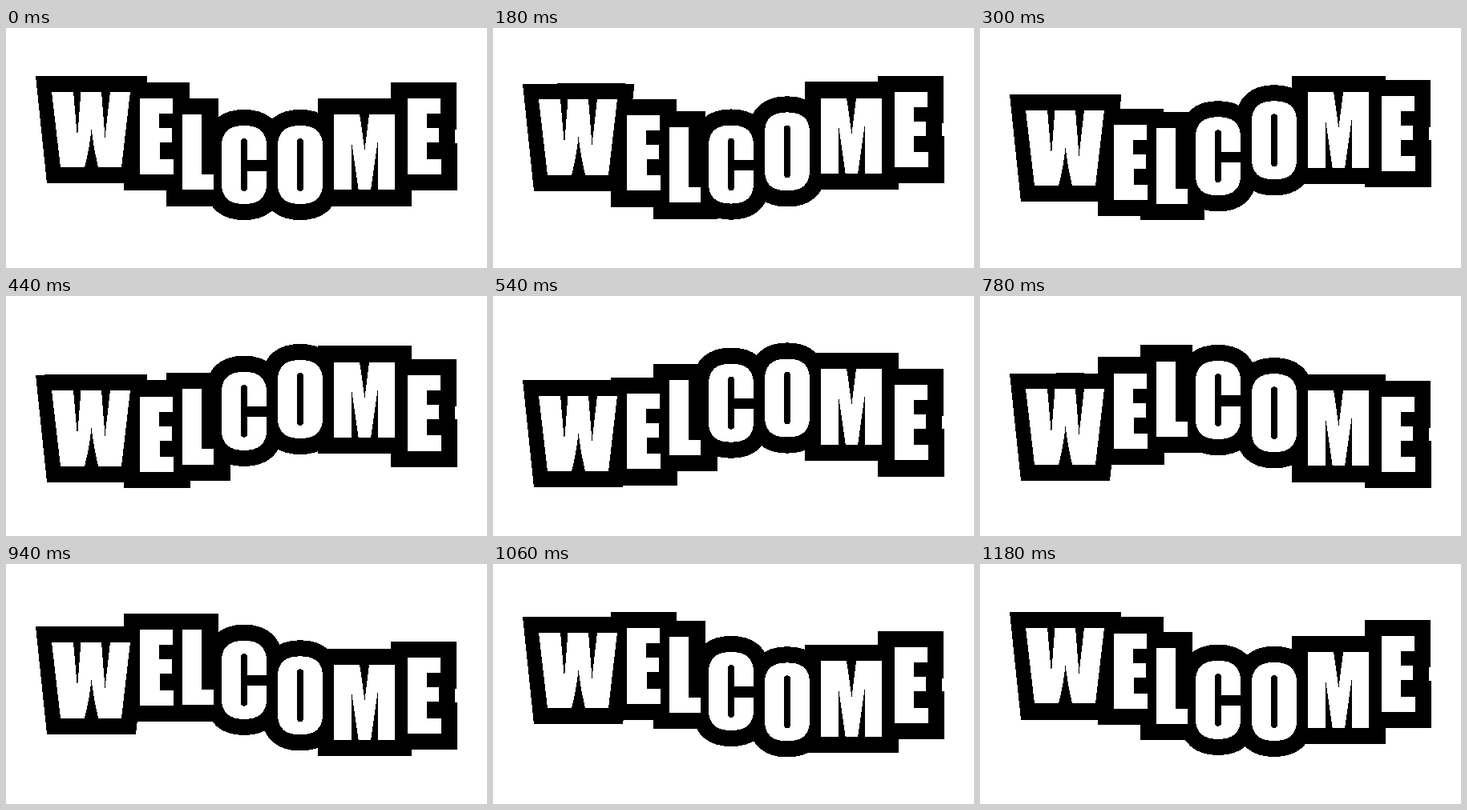
Write an HTML page that moves like this. It is 600x300 px and loops after 1.2 s.

```html
<!DOCTYPE html>
<html lang="en">
<head>
<meta charset="utf-8">
<title>Welcome</title>
<style>
  @property --k {
    syntax: "<integer>";
    inherits: true;
    initial-value: 0;
  }
  html, body {
    margin: 0;
    width: 100%;
    height: 100%;
    overflow: hidden;
    background: #fff;
  }
  svg {
    display: block;
    width: 600px;
    height: 300px;
    shape-rendering: crispEdges;
    animation: tick 1200ms steps(60) infinite;
  }
  /* 60 held poses per loop, each letter a seventh of a turn ahead */
  @keyframes tick {
    from { --k: 0; }
    to { --k: 60; }
  }
  use {
    transform: translateY(calc(-23px * cos(var(--k) * 6deg + var(--i) * 360deg / 7)));
  }
  .rim { fill: #000; stroke: #000; stroke-width: 40.24; }
  .face { fill: #fff; }
  .w { --i: 0; }
  .e { --i: 1; }
  .l { --i: 2; }
  .c { --i: 3; }
  .o { --i: 4; }
  .m { --i: 5; }
  .e2 { --i: 6; }
</style>
</head>
<body>
<svg viewBox="0 0 600 300" role="img" aria-label="WELCOME">
  <defs>
    <path id="slab" stroke="none" d="M-20-19.5L50-19.7L119.5-19.6L105 114.770H-6z"/>
    <path id="W" d="M0 0H27L32 57L36.5 0H62L66.5 57L73 0H98L87 94.650H58Q52.5 72 49.5 47Q47 72 41 94.650H11z"/>
    <path id="E" d="M0 0H41V19H24V37H39.6V55H24.3V75.550H42.050V94.650H0z"/>
    <path id="L" d="M0 0H24.050V75.550H39.050V94.650H0z"/>
    <path id="C" d="M28.2-5.6H4.2V-24C4.2-30 4-33 0-33S-4.2-30-4.2-24V24C-4.2 30-4 33 0 33S4.2 30 4.2 24V7.6H28.2V22C28.2 42 18 49 0 49S-28.2 42-28.2 22V-22C-28.2-42-18-49 0-49S28.2-42 28.2-22z"/>
    <path id="O" fill-rule="evenodd" d="M0-49C18-49 28.2-42 28.2-22V22C28.2 42 18 49 0 49S-28.2 42-28.2 22V-22C-28.2-42-18-49 0-49zM0-33C-4-33-4.2-30-4.2-24V24C-4.2 30-4 33 0 33S4.2 30 4.2 24V-24C4.2-30 4-33 0-33z"/>
    <path id="M" d="M0 0H32Q33.5 9 35 20L38.4 45L44.1 0H76.4V94.650H55.1V31L46.1 94.650H30.7L21.7 32V94.650H0z"/>
  </defs>
  <g class="rim">
    <use class="w" href="#slab" x="57" y="102.65"/>
    <use class="e" href="#E" x="167.4" y="102.65"/>
    <use class="l" href="#L" x="220.4" y="102.65"/>
    <use class="c" href="#C" x="297" y="150.3"/>
    <use class="o" href="#O" x="367" y="150.3"/>
    <use class="m" href="#M" x="409" y="102.65"/>
    <use class="e2" href="#E" x="500.6" y="102.65"/>
  </g>
  <g class="face">
    <use class="w" href="#W" x="57" y="102.65"/>
    <use class="e" href="#E" x="167.4" y="102.65"/>
    <use class="l" href="#L" x="220.4" y="102.65"/>
    <use class="c" href="#C" x="297" y="150.3"/>
    <use class="o" href="#O" x="367" y="150.3"/>
    <use class="m" href="#M" x="409" y="102.65"/>
    <use class="e2" href="#E" x="500.6" y="102.65"/>
  </g>
</svg>
</body>
</html>
```
